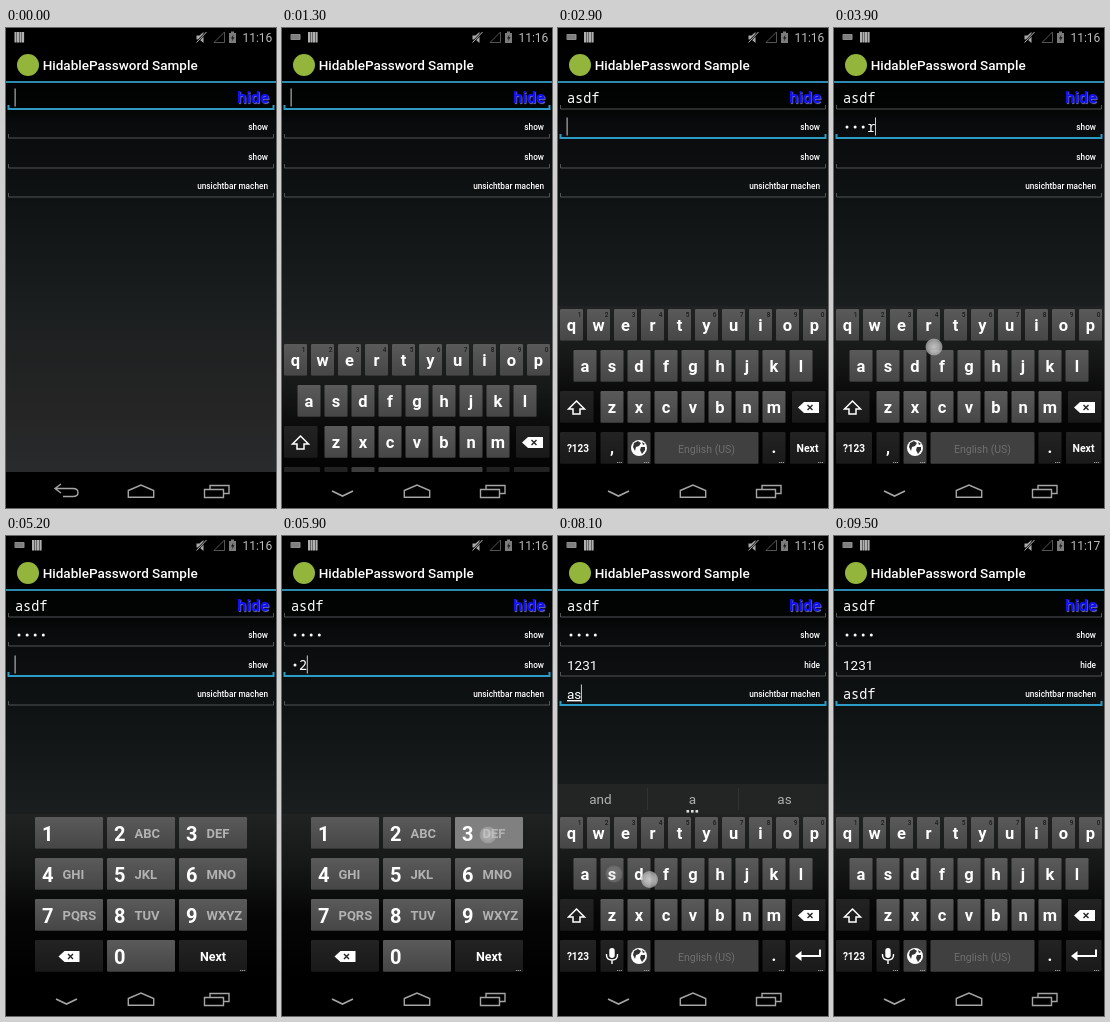
Write an HTML page that moves like this. It is 270 px wide and 480 px high and loops after 9600 ms.

```html
<!DOCTYPE html>
<html lang="en">
<head>
<meta charset="utf-8">
<title>HidablePassword Sample</title>
<style>
html, body { margin: 0; width: 100%; height: 100%; overflow: hidden; background: #000; }
svg { display: block; width: 100vw; height: 100vh; font-family: Roboto, sans-serif; }
.mono { font-family: "Noto Sans Mono", monospace; }
.composing { text-decoration: underline; text-decoration-thickness: 1px; }
.glow { text-shadow: .8px .8px 1px #7070b8; }
</style>
</head>
<body>
<svg viewBox="0 0 270 480" xmlns="http://www.w3.org/2000/svg">
  <defs>
    <linearGradient id="page" x1="0" y1="0" x2="0" y2="1">
      <stop offset="0" stop-color="#000"/><stop offset=".16" stop-color="#020303"/>
      <stop offset=".2" stop-color="#090b0c"/><stop offset=".35" stop-color="#0f1213"/>
      <stop offset=".6" stop-color="#1c1f20"/><stop offset=".8" stop-color="#252525"/>
      <stop offset="1" stop-color="#2b2e31"/>
    </linearGradient>
    <linearGradient id="board" x1="0" y1="0" x2="0" y2="1">
      <stop offset="0" stop-color="#212222"/><stop offset=".3" stop-color="#161717"/>
      <stop offset=".6" stop-color="#060606"/><stop offset="1" stop-color="#000"/>
    </linearGradient>
    <linearGradient id="key" x1="0" y1="0" x2="0" y2="1">
      <stop offset="0" stop-color="#5a5a5a"/><stop offset="1" stop-color="#464646"/>
    </linearGradient>
    <linearGradient id="dark" x1="0" y1="0" x2="0" y2="1">
      <stop offset="0" stop-color="#232323"/><stop offset="1" stop-color="#191919"/>
    </linearGradient>
    <linearGradient id="bubble" x1="0" y1="0" x2="0" y2="1">
      <stop offset="0" stop-color="#8e8e8e"/><stop offset="1" stop-color="#6b6b6b"/>
    </linearGradient>
    <radialGradient id="touch">
      <stop offset="0" stop-color="#dcdcdc" stop-opacity=".9"/><stop offset=".55" stop-color="#ccc" stop-opacity=".82"/>
      <stop offset=".88" stop-color="#bbb" stop-opacity=".72"/><stop offset="1" stop-color="#999" stop-opacity="0"/>
    </radialGradient>
  </defs>
  <g id="stage"></g>
</svg>
<script>
const LOOP = 9600, STEP = 100, BLINK = 220, EM = 13.5;
const stage = document.getElementById('stage');
const ruler = document.createElement('canvas').getContext('2d');

const rect = (x, y, w, h, fill, more = '') => `<rect x="${x}" y="${y}" width="${w}" height="${h}" fill="${fill}" ${more}/>`;
const text = (s, x, y, size, fill = '#fff', more = '') => `<text x="${x}" y="${y}" font-size="${size}" fill="${fill}" ${more}>${s}</text>`;
const line = (d, color, width = 1, more = '') => `<path d="${d}" fill="none" stroke="${color}" stroke-width="${width}" ${more}/>`;
const shape = (d, fill, more = '') => `<path d="${d}" fill="${fill}" ${more}/>`;
const dot = (x, y, r, fill, more = '') => `<circle cx="${x}" cy="${y}" r="${r}" fill="${fill}" ${more}/>`;
const MID = 'text-anchor="middle"', END = 'text-anchor="end"';
const BOLD = 'font-weight="700"', MEDIUM = 'font-weight="500"';

// Latest entry of a [time, ...state] list
const at = (list, t) => list.filter(e => e[0] <= t).pop();

// Per field: [time, value, style, caret at start]
const values = [
  [[-150, '', 'plain'], [1200, '', 'plain'], [1700, 'a', 'composing'], [1800, 'as', 'composing'], [1900, 'asd', 'composing'],
    [2000, 'asdf', 'composing'], [2300, '••••', 'mono', 1], [2600, 'asdf', 'mono', 1]],
  [[0, '', 'mono'], [2900, '', 'mono'], [3300, 'a', 'mono'], [3600, '•s', 'mono'], [3800, '••d', 'mono'], [3900, '•••r', 'mono'],
    [4600, '••••', 'mono']],
  [[0, '', 'mono'], [4760, '', 'mono'], [5500, '1', 'mono'], [5800, '•2', 'mono'], [6000, '••3', 'mono'], [6200, '•••1', 'mono'],
    [6500, '1231', 'plain', 1], [6800, '••••', 'mono', 1], [7000, '1231', 'plain', 1]],
  [[0, '', 'plain'], [7500, '', 'plain'], [8000, 'a', 'composing'], [8100, 'as', 'composing'], [8200, 'asd', 'composing'],
    [8300, 'asdf', 'composing'], [8600, '••••', 'mono', 1], [8835, 'asdf', 'mono', 1]]
];
const labels = [
  [[0, 'hide'], [2300, 'show'], [2600, 'hide']],
  [[0, 'show']],
  [[0, 'show'], [6500, 'hide'], [6800, 'show'], [7000, 'hide']],
  [[0, 'unsichtbar machen'], [8600, 'sichtbar machen'], [8835, 'unsichtbar machen']]
];
const focus = [[0, 0], [2900, 1], [4700, 2], [7500, 3]];
const boards = [[0, ''], [1200, 'abc'], [4700, 'num'], [7500, 'abc']];
const strips = [[0, false], [1400, true], [2300, false], [7600, true], [8500, false]];
const guesses = [[0], [1800, 'and', 'a', 'as'], [1900, 'was', 'as', 'has'], [2100, 'add', 'asdf', 'ads'],
  [7500], [8100, 'and', 'a', 'as'], [8200, 'was', 'as', 'has']];

// [from, to, x, y, key, bubble, alpha]
const taps = [
  [1000, 1200, 96, 70],
  [1600, 1700, 27, 342, 'a', 1], [1700, 1800, 55, 342, 's', 1], [1800, 1900, 82, 343, 'd', 1], [1900, 2000, 107, 343, 'f', 1],
  [2200, 2300, 247, 71], [2500, 2600, 247, 71], [2800, 2900, 110, 100],
  [3200, 3300, 27, 341, 'a'], [3500, 3600, 55, 341, 's'], [3700, 3800, 82, 341, 'd'],
  [3800, 3900, 99, 312, 'r'], [3900, 4000, 100, 319],
  [4500, 4700, 110, 130],
  [5400, 5500, 64, 299, '1'], [5700, 5800, 134, 299, '2'], [5900, 6000, 206, 299, '3'], [6100, 6200, 64, 299, '1'],
  [6300, 6500, 255, 137], [6600, 6900, 255, 139], [6900, 7000, 255, 138],
  [7400, 7500, 110, 160],
  [7900, 8000, 27, 341, 'a', 1], [8000, 8100, 56, 338, 's', 1],
  [8100, 8200, 56, 338, '', 0, .3], [8100, 8200, 91.5, 343.5], [8200, 8300, 108, 343, 'f', 1],
  [8500, 8600, 236, 160], [8800, 8900, 236, 160]
];

function statusBar(t) {
  const bars = x => [0, 1, 2, 3].map(i => rect(x + i * 2.5, 4, 2.1, 10.5, '#b0b0b0')).join('');
  let s = rect(0, 0, 270, 20, '#000');
  if (t < 1300) s += bars(8.5);
  else {
    s += rect(8.5, 6, 10, 6, '#8c8c8c', 'rx=".8"') + line('M9.500 8h8M9.500 10h8', '#444', .7, 'stroke-dasharray="1 1"');
    s += bars(26);
  }
  s += shape('M190.5 7.500h3l4-3.500v11l-4-3.500h-3z', '#aaa') + line('M190.500 14.500l10-10.500', '#000', 2) + line('M190.500 14.500l10-10.500', '#bbb');
  s += line('M208 14.500h10.500v-10.500z', '#555');
  s += rect(223, 5, 7, 10, '#7c7c7c') + rect(225, 3.5, 3, 2, '#7c7c7c') + shape('M227.500 6.500l-2.500 4h1.600l-.8 3 2.700-4.200h-1.700z', '#151515');
  return s + text(t < 8500 ? '11:16' : '11:17', 266.3, 14, 12, '#bdbdbd', END);
}

function titleBar() {
  return rect(0, 20, 270, 33, '#000') + dot(22, 37, 11, '#93b53c')
    + text('HidablePassword Sample', 36.7, 42, EM, '#fff', MEDIUM) + rect(0, 53, 270, 2, '#2b8aad');
}

function field(i, t, focused) {
  const y = Math.round(81 + i * 29.33), base = y - 6;
  const [since, value, style, start] = at(values[i], t);
  const label = at(labels[i], t)[1];
  let s = line(`M2.500 ${y - 4}v4h265v-4`, focused ? '#2c9cc4' : '#5a5d5f', focused ? 2 : .9);
  const hidden = value.split('•').length - 1;
  for (let n = 0; n < hidden; n++) s += dot(13 + n * 8.1, base - 5, 1.5, '#fff');
  const shown = value.slice(hidden);
  if (shown) s += text(shown, 9 + hidden * 8.1, base, EM, '#fff', `class="${style}"`);
  if (focused && Math.floor((t - since) / BLINK) % 2 === 0) {
    ruler.font = `${EM}px Roboto, sans-serif`;
    const w = style === 'mono' ? value.length * 8.1 : ruler.measureText(value).width;
    s += rect(start ? 8.6 : 8.6 + w, y - 20.5, 1, 18, '#ccc');
  }
  return s + (i === 0
    ? text(label, 263, 75.4, 16.5, '#1010ff', `${END} ${BOLD} class="glow"`)
    : text(label, 262, y - 8, 8.25, '#fff', `${END} ${MEDIUM}`));
}

function navBar(open) {
  const c = '#a5a5a5';
  return rect(0, 444, 270, 36, '#000')
    + (open ? line('M50 463l10.500 5 10.500-5', c, 1.7)
            : line('M55 456l-6 4.500 6 4.500M49 460.500h18q5 0 5 4t-5 4h-10', c, 1.4))
    + line('M122.300 462.500l12.700-5.500 12.700 5.500v6.800h-25.400z', c, 1.4)
    + line('M198.500 461.500h19v8h-19zM204 461v-3.500h19v8h-5', c, 1.4);
}

const cap = (x, y, w, fill) => rect(x, y, w, 32, fill, 'rx="1.2"') + rect(x, y + 31, w, 1, '#000', 'opacity=".25"');
const more = x => line(`M${x} 434.500h5`, '#999', 1, 'stroke-dasharray="1.2 .7"');
const erase = (x, y) => shape(`M${x - 10.5} ${y}l6-5.500h15v11h-15z`, '#fff') + line(`M${x - 1} ${y - 2.5}l5 5m0-5l-5 5`, '#222', 1.4);
const rows = [['qwertyuiop', 13.5, 281], ['asdfghjkl', 27, 322], ['zxcvbnm', 54, 363]];

function letters(pressed, next) {
  let s = '';
  for (const [keys, x0, y] of rows) [...keys].forEach((k, i) => {
    const x = x0 + i * 27;
    s += cap(x - 11.5, y, 23, k === pressed ? '#808080' : 'url(#key)') + text(k, x, y + 22, 16.5, '#fff', `${MID} ${BOLD}`);
    if (y === 281) s += text((i + 1) % 10, x + 10, y + 8, 6.5, '#1c1c1c', `${END} ${MEDIUM}`);
  });
  s += cap(2, 363, 33.5, 'url(#dark)') + line('M18.500 373l-8 8h4.500v5h7v-5h4.500z', '#fff', 1.5);
  s += cap(234, 363, 33.5, 'url(#dark)') + erase(250.5, 379.5);
  for (const [x, w] of [[2, 36], [42.5, 23], [204.5, 23], [232, 35.5]]) s += cap(x, 404, w, 'url(#dark)');
  s += cap(69.5, 404, 23, '#3d3d3d') + cap(96.5, 404, 104, '#404040') + text('English (US)', 148.5, 424.5, 10.5, '#6e6e6e', MID);
  s += text('?123', 20, 424, 10, '#fff', `${MID} ${BOLD}`) + text('.', 216, 425, 16.5, '#fff', `${MID} ${BOLD}`);
  s += next ? text(',', 54, 425, 16.5, '#fff', `${MID} ${BOLD}`)
    : rect(51.3, 412, 5.4, 10, '#fff', 'rx="2.7"') + line('M48.500 418v1q0 5 5.500 5t5.500-5v-1M54 424v4', '#fff', 1.4);
  s += dot(81, 420, 8, '#fff') + shape('M76 415l4-2 3 2-2 3-3 1-1 4-2-4zM83 419l4 0 0 3-3 4-2-4zM84 414l3 2-2 1z', '#333');
  s += next ? text('Next', 249.5, 424, 10.5, '#fff', `${MID} ${BOLD}`)
    : line('M262 413.500v6.500h-21', '#fff', 2) + shape('M237 420l6.500-5v10z', '#fff');
  return s + more(59) + more(86) + more(221) + more(260);
}

function digits(pressed) {
  const groups = ['', 'ABC', 'DEF', 'GHI', 'JKL', 'MNO', 'PQRS', 'TUV', 'WXYZ'];
  const digit = (n, x, y) => cap(x, y, 68, String(n) === pressed ? '#808080' : 'url(#key)') + text(n, x + 7, y + 23.5, 20, '#fff', BOLD);
  let s = groups.map((g, i) => {
    const x = 29 + i % 3 * 72, y = 281 + Math.floor(i / 3) * 41;
    return digit(i + 1, x, y) + text(g, x + 27.5, y + 21, 13, '#b2b2b2', BOLD);
  }).join('');
  s += cap(29, 404, 68, 'url(#dark)') + erase(63, 420.5) + digit(0, 101, 404);
  return s + cap(173, 404, 68, 'url(#dark)') + text('Next', 207, 425, 12.5, '#fff', `${MID} ${BOLD}`) + more(234);
}

function suggestions(t) {
  let s = rect(0, 248, 270, 30, '#232525') + line('M89.500 252v22M180.500 252v22', '#303233');
  const words = at(guesses, t).slice(1);
  // The middle word is bold once it is a correction of two letters or more
  words.forEach((w, i) => s += text(w, 42.5 + i * 92, 267.8, EM, '#b0b0b0', `${MID} ${i === 1 && w.length > 1 ? BOLD : ''}`));
  if (words.length) for (const x of [128.5, 133, 137.5]) s += rect(x, 274, 2.6, 2.6, '#ddd');
  return s;
}

function bubble(k) {
  const [keys, x0, y] = rows.find(r => r[0].includes(k));
  const x = x0 + keys.indexOf(k) * 27 + .7;
  return shape(`M${x - 16} ${y - 52.5}h32q2 0 2 2v40l-14 11q-4 2-8 0l-14-11v-40q0-2 2-2z`, 'url(#bubble)', 'stroke="#2a2a2a" stroke-width=".7"')
    + text(k, x, y - 21, 25, '#fff', `${MID} ${BOLD}`);
}

function draw(t) {
  const focused = at(focus, t)[1], board = at(boards, t)[1];
  const active = taps.filter(p => t >= p[0] && t < p[1]);
  const hit = active.find(p => p[4]) || [];
  let s = rect(0, 0, 270, 480, 'url(#page)') + titleBar();
  for (let i = 0; i < 4; i++) s += field(i, t, i === focused);
  if (board) {
    const drop = t < 1300 ? 110 : t < 1400 ? 35 : 0;
    s += `<g transform="translate(0 ${drop})">` + rect(0, 278, 270, 166, 'url(#board)')
      + (at(strips, t)[1] ? suggestions(t) : '')
      + (board === 'num' ? digits(hit[4]) : letters(hit[4], focused === 1)) + '</g>';
  }
  s += navBar(board) + statusBar(t);
  if (hit[5]) s += bubble(hit[4]);
  for (const p of active) s += dot(p[2], p[3], 9, 'url(#touch)', `opacity="${p[6] || (p[4] ? .6 : .95)}"`);
  stage.innerHTML = s;
}

let last = -1;
const begin = performance.now();
function tick() {
  const t = Math.floor((performance.now() - begin) % LOOP / STEP) * STEP;
  if (t !== last) draw(last = t);
  requestAnimationFrame(tick);
}
tick();
</script>
</body>
</html>
```
